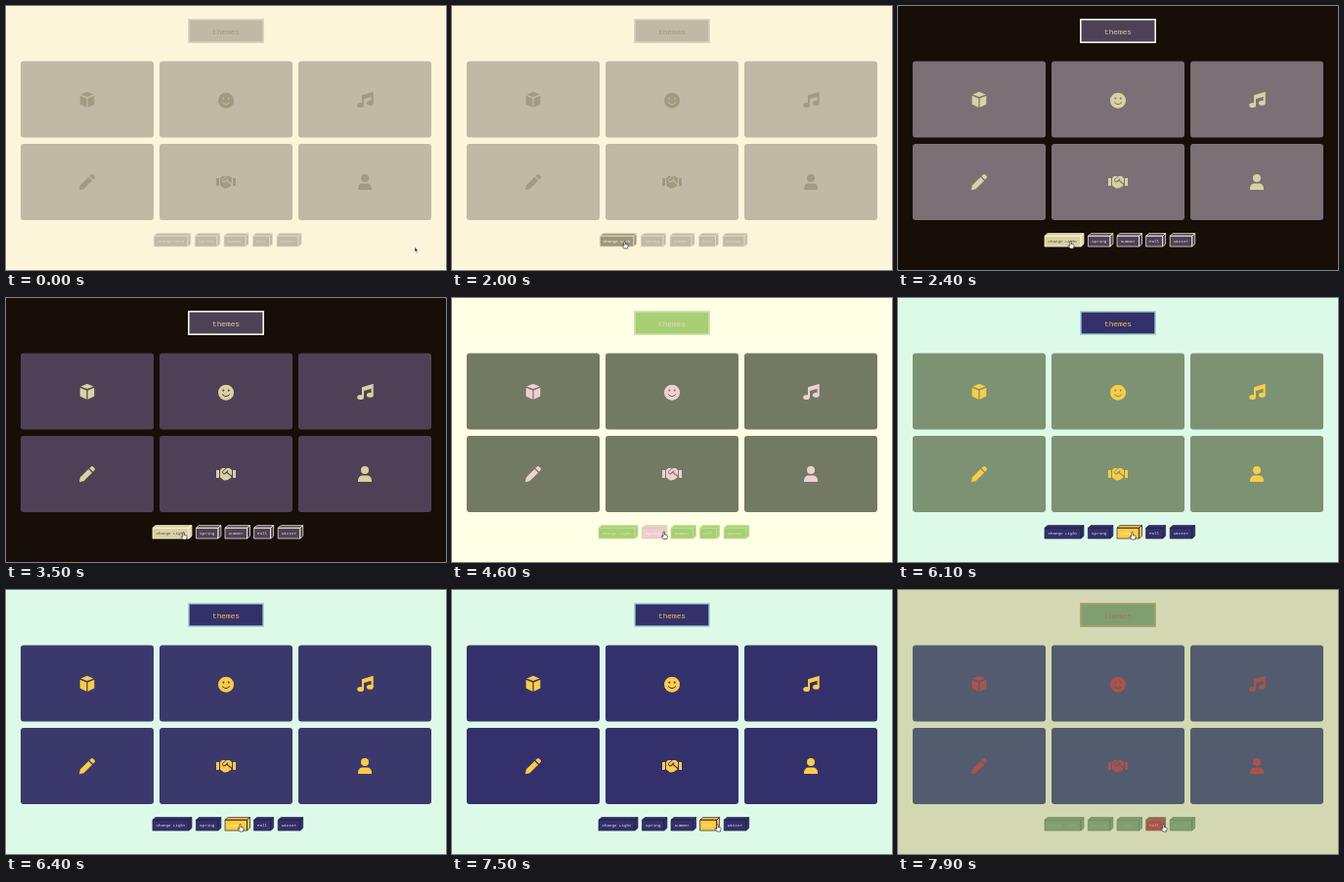
Write an HTML page that moves like this. It is 450 px wide and 270 px high and loops after 8 s.

```html
<!DOCTYPE html>
<html lang="en">
<head>
<meta charset="utf-8">
<title>themes</title>
<style>
  html, body { margin: 0; width: 100%; height: 100%; overflow: hidden; }
  svg { display: block; width: 100vw; height: 100vh; background: var(--bg); }
  text { font-family: "Liberation Mono", "Noto Sans Mono", monospace; text-anchor: middle; }
  .panel { fill: var(--panel); }
  .icons { fill: var(--icon); }
  .cut { fill: none; stroke: var(--panel); stroke-linecap: round; }
  .title rect { fill: var(--button); stroke: var(--border); stroke-width: 1.6; }
  .title text { fill: var(--text); font-size: 7.8px; }
  .button path { stroke: var(--edge); stroke-width: .7; stroke-linejoin: round; }
  .button text { font-size: 4.2px; }
  .cursor path { fill: #fff; stroke: #111; stroke-width: .6; stroke-linejoin: round; }
  #arrow path { fill: #222; stroke: #fff; stroke-width: .5; }
</style>
</head>
<body>
<svg id="stage" viewBox="0 0 450 270">
  <g class="title">
    <rect x="186.8" y="13.8" width="76.4" height="23.4"/>
    <text x="225" y="28.6">themes</text>
  </g>
  <g id="panels"></g>
  <g class="icons">
    <path d="M83 87.8l6.6 2.6-6.6 2.7-6.6-2.7zM75.7 91.7l6.7 2.8v9.3l-6.7-3.4zM90.3 91.7l-6.7 2.8v9.3l6.7-3.4z"/>
    <circle cx="225" cy="96.7" r="8"/>
    <path class="cut" stroke-width="2" d="M222.3 94.6h.01M227.7 94.6h.01"/>
    <path class="cut" stroke-width="1" d="M221.3 98.7q3.7 4 7.4 0"/>
    <path d="M364 91.2L375.7 87.7V99H373.6V92.8L366 95V101.5H364z"/>
    <ellipse cx="362.6" cy="101.6" rx="3.4" ry="2.5"/>
    <ellipse cx="372.3" cy="99.3" rx="3.4" ry="2.5"/>
    <path d="M75 188.2l.8-4.6 8.6-8.6 3.7 3.7-8.6 8.6zM85.3 174.1l1.7-1.6a1.5 1.5 0 0 1 2.1 0l1.5 1.5a1.5 1.5 0 0 1 0 2.1l-1.6 1.7z"/>
    <g transform="translate(215 172)">
      <path d="M0 4h3v7a1 1 0 0 1-1 1h-2zM17 4h3v8h-2a1 1 0 0 1-1-1z"/>
      <path d="M13.6 2h-2.7l-3.8 3.2a1.2 1.2 0 0 0 1.7 1.7l3-2.6.7.8-1 1 4.5 3.7V4z"/>
      <path d="M4 4l2-2h3.8l-3.5 3.1a2.2 2.2 0 0 0 3 3l1.5-1.2 4.3 3.6a1.2 1.2 0 0 1-.3 1.8l-1.5.5-1.3 1.2-2 .2a2 2 0 0 1-2 .2L4 11.5z"/>
    </g>
    <circle cx="367" cy="176" r="4"/>
    <path d="M360 188v-1.8a4.6 4.6 0 0 1 4.6-4.6h4.8a4.6 4.6 0 0 1 4.6 4.6v1.8z"/>
  </g>
  <g id="buttons"></g>
  <g id="arrow" class="cursor"><path d="M0 0V5l1.2-1 .9 1.9 .9-.4-.9-1.8h1.5z"/></g>
  <g id="hand" class="cursor"><path d="M-.7 .7a.7.7 0 0 1 1.4 0V3l2.2.5q.9.3.7 1.3l-.6 2.7h-3.4l-2-2.6q-.1-1 .9-.6l.8.6z"/></g>
</svg>
<script>
const LOOP = 8000, STEP = 100, FAST = 250, SLOW = 700, HOVER = 300;
const KEYS = ["bg", "panel", "border", "text", "icon", "button", "label", "hover", "hoverLabel", "edge"];

// Each theme: start time, then one colour per key
const themes = [
  [-9999, "fcf5da c1b8a5 ddd5bf a29a83 a29a83 c1b8a5 e6ddc8 9e9679 fffbe8 e3dbc5"],
  [2000, "170e08 4e4157 fff8df d8d2a0 d8d2a0 4e4157 f3ebcb d8d2a0 4e4157 fff8df"],
  [4300, "ffffe6 acd279 d3e6ae efd0cd f0d0d2 a6d073 e3e2b4 f0cbcf fffaf0 c6dc9c"],
  [5800, "ddfae8 34306b a9d9d3 f5c443 fdcc45 34306b e9eedf ffcc3e fff3cf 23204d"],
  [7600, "d4d8b2 7f9f72 b8a168 a9744f a8544c 7f9f72 b7a56e ad524a e8c07c 6f8b5c"]
].map(([at, list]) => ({ at, colors: list.split(" ").map(h => [0, 2, 4].map(i => parseInt(h.substr(i, 2), 16))) }));

// Label, x and width before and after the first switch, hover start and end
const buttons = [
  ["Change Dark", 151.3, 34.5, 150, 37, 1250, 3700],
  ["Spring", 193.3, 22.5, 194.4, 22.5, 3800, 5450],
  ["Summer", 223, 22, 224, 22.5, 5500, 7150],
  ["Fall", 252.5, 17, 253.6, 17, 7200, 9999],
  ["Winter", 277, 22, 278.2, 22.5, 9999, 9999]
];

// Pointer tip: time, x, y
const track = [
  [0, 418, 246.5], [200, 418, 246.5], [500, 438, 252], [1000, 213, 249], [1300, 176.5, 240.5],
  [2800, 176.5, 240.5], [3200, 181.5, 239.5], [3500, 181.5, 239.5], [4000, 216.5, 239],
  [5200, 217, 239], [5500, 224.5, 239], [5900, 239.5, 239.5], [6900, 239.5, 239.5],
  [7300, 271.5, 239.5], [8000, 271.5, 239.5]
];

const $ = id => document.getElementById(id);
const clamp = v => Math.max(0, Math.min(1, v));
const smooth = v => (v = clamp(v)) * v * (3 - 2 * v);
const mix = (a, b, k) => a + (b - a) * k;
const blend = (a, b, k) => a.map((v, i) => mix(v, b[i], k));
const css = c => `rgb(${c.map(Math.round)})`;

for (const y of [56.5, 141])
  for (const x of [15, 157, 299])
    $("panels").innerHTML += `<rect class="panel" x="${x}" y="${y}" width="136" height="78" rx="3"/>`;

$("buttons").innerHTML = buttons.map(b => `<g class="button"><path/><text y="242">${b[0]}</text></g>`).join("");
const nodes = [...$("buttons").children].map(g => ({ box: g.children[0], label: g.children[1] }));

function palette(t) {
  let out = themes[0].colors;
  for (const { at, colors } of themes.slice(1))
    out = out.map((c, i) => blend(c, colors[i], smooth((t - at) / (KEYS[i] === "panel" ? SLOW : FAST))));
  return Object.fromEntries(KEYS.map((k, i) => [k, out[i]]));
}

function pointer(t) {
  const i = track.findIndex(p => p[0] > t), a = track[i - 1], b = track[i];
  const k = smooth((t - a[0]) / (b[0] - a[0]));
  return [mix(a[1], b[1], k), mix(a[2], b[2], k)];
}

function draw(t) {
  const p = palette(t), switched = t > themes[1].at;
  for (const k of KEYS) $("stage").style.setProperty("--" + k, css(p[k]));

  buttons.forEach((b, i) => {
    const [x, w] = switched ? b.slice(3, 5) : b.slice(1, 3), { box, label } = nodes[i];
    const k = smooth((t - b[5]) / HOVER) - smooth((t - b[6]) / HOVER);
    box.setAttribute("d", `M${x} 235.2h${w}v10.8h${-w}zl3 -2.6h${w}l-3 2.6zM${x + w} 235.2l3-2.6v10.8l-3 2.6z`);
    box.style.fill = css(blend(p.button, p.hover, k));
    label.setAttribute("x", x + w / 2);
    label.style.fill = css(blend(p.label, p.hoverLabel, k));
  });
  nodes[0].label.textContent = switched ? "Change Light" : "Change Dark";

  const over = t >= buttons[0][5];
  for (const id of ["arrow", "hand"]) {
    $(id).setAttribute("transform", `translate(${pointer(t)})`);
    $(id).style.display = (id === "hand") === over ? "" : "none";
  }
}

const start = performance.now();
function tick() {
  const t = (performance.now() - start) % LOOP;
  draw(Math.floor(t / STEP) * STEP);
  requestAnimationFrame(tick);
}
tick();
</script>
</body>
</html>
```
